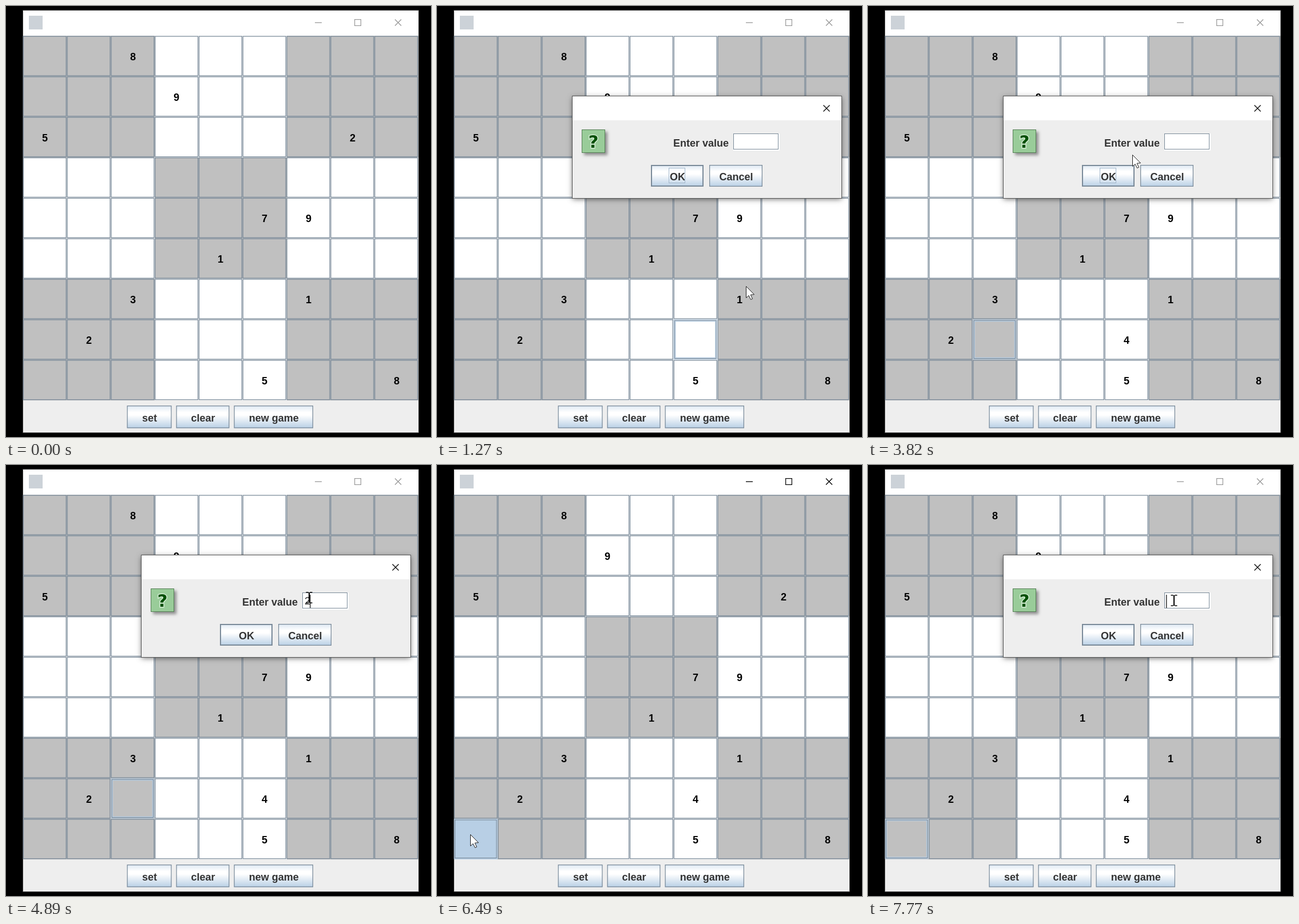
An HTML page with a canvas for the animation above (7.99 s loop, 743 by 754 pixels).

```html
<!DOCTYPE html>
<html lang="en">
<head>
<meta charset="utf-8">
<title>Number puzzle</title>
<style>
html, body { margin: 0; width: 100%; height: 100%; overflow: hidden; background: #000; }
canvas { display: block; }
</style>
</head>
<body>
<canvas id="stage" width="743" height="754"></canvas>
<script>
const ctx = document.getElementById("stage").getContext("2d");
const LOOP = 7990, TICK = 106.6;
const GRID = { x: 29.65, y: 52.4, w: 76.81, h: 70.85 };
const EDGE = "#7a8a99", PALE = "#b8cfe5", FOCUS = "#a3b8cc", PANEL = "#eeeeee", INK = "#333333";
const BOLD = "bold 18px 'Liberation Sans', Arial, sans-serif";
const PLAIN = "18px 'Liberation Sans', Arial, sans-serif";
const PUZZLE = ["  8", "   9", "5      2", "", "     79", "    1", "  3   1", " 2", "     5  8"];

// Each turn clicks a cell, opens the input box, focuses its field and types a digit.
const TURNS = [
  { press: 950, open: 1050, focus: 1900, type: 2330, close: 2540, digit: "4" },
  { press: 3820, open: 3820, focus: 4570, type: 4890, close: 5110, digit: "2" },
  { press: 6490, open: 6600, focus: 7120, type: LOOP, close: LOOP, digit: "" }
];
const MESSAGE = { open: 5210, close: 5750 };

// Pointer strokes: start time, end time, destination.
const ENTRY = { x: 672, y: 690, time: 520 };
const STROKES = [
  [520, 900, 456, 586], [1060, 1260, 540, 490], [1270, 1460, 557, 234],
  [2750, 3180, 300, 605], [3290, 3390, 232, 592], [3730, 3820, 462, 260],
  [3830, 4150, 533, 210], [4260, 4660, 530, 232], [5860, 6280, 6, 662],
  [6290, 6480, 58, 646], [6500, 7020, 544, 229], [7560, 7760, 535, 237]
];

const easeOut = p => 1 - (1 - p) ** 3;
const within = (time, from, to) => time >= from && time < to;

// The pointer moves in steps, as in a screen recording.
function pointerAt(time) {
  const stepped = ENTRY.time + Math.floor((time - ENTRY.time + 13) / TICK) * TICK;
  let { x, y } = ENTRY;
  for (const [start, end, toX, toY] of STROKES) {
    if (stepped <= start) break;
    const p = easeOut(Math.min(1, (stepped - start) / (end - start)));
    x += (toX - x) * p;
    y += (toY - y) * p;
  }
  return { x, y };
}

function cellAt({ x, y }) {
  const col = Math.floor((x - GRID.x) / GRID.w), row = Math.floor((y - GRID.y) / GRID.h);
  return col >= 0 && col < 9 && row >= 0 && row < 9 ? row * 9 + col : -1;
}

function stateAt(time) {
  const [first, second] = TURNS;
  const pointer = time >= ENTRY.time ? pointerAt(time) : null;
  const turn = TURNS.findLast(t => time >= t.press);
  const input = turn && within(time, turn.open, turn.close);
  const blocked = input || within(time, second.close, MESSAGE.close);
  const target = blocked ? pointerAt(turn.open - 60) : pointer;
  return {
    pointer, input, turn,
    active: Boolean(turn) && !blocked,
    hover: target ? cellAt(target) : -1,
    pressed: turn && within(time, turn.press, turn.open),
    focused: input && time >= turn.focus,
    caret: input && time >= turn.focus + TICK - 5,
    typed: input && time >= turn.type ? turn.digit : "",
    message: within(time, MESSAGE.open, MESSAGE.close),
    solved: time >= first.close,
    boxed: within(time, first.close, second.open)
  };
}

function fill(x, y, w, h, color) {
  ctx.fillStyle = color;
  ctx.fillRect(x, y, w, h);
}

function frame(x, y, w, h, color, line = 1) {
  ctx.strokeStyle = color;
  ctx.lineWidth = line;
  ctx.strokeRect(x + line / 2, y + line / 2, w - line, h - line);
}

function text(string, x, y, { font = BOLD, color = INK, align = "left" } = {}) {
  ctx.font = font;
  ctx.fillStyle = color;
  ctx.textAlign = align;
  ctx.fillText(string, x, y);
}

function cross(x, y, size, color) {
  ctx.strokeStyle = color;
  ctx.lineWidth = 1.3;
  ctx.beginPath();
  ctx.moveTo(x, y);
  ctx.lineTo(x + size, y + size);
  ctx.moveTo(x + size, y);
  ctx.lineTo(x, y + size);
  ctx.stroke();
}

function withShadow(blur, dx, dy, alpha, draw) {
  ctx.save();
  ctx.shadowColor = `rgba(0,0,0,${alpha})`;
  ctx.shadowBlur = blur;
  ctx.shadowOffsetX = dx;
  ctx.shadowOffsetY = dy;
  draw();
  ctx.restore();
}

function button(label, x, y, w, h, isDefault) {
  const shade = ctx.createLinearGradient(0, y, 0, y + h);
  shade.addColorStop(0, "#dde8f3");
  shade.addColorStop(0.3, "#ffffff");
  shade.addColorStop(0.42, "#ffffff");
  shade.addColorStop(1, PALE);
  fill(x, y, w, h, shade);
  frame(x, y, w, h, EDGE, isDefault ? 2 : 1.25);
  text(label, x + w / 2 + 0.5, y + h / 2 + 8, { align: "center" });
}

function drawCell(index, state) {
  const col = index % 9, row = Math.floor(index / 9);
  const x = GRID.x + col * GRID.w, y = GRID.y + row * GRID.h;
  const w = GRID.w - 0.7, h = GRID.h - 0.7;
  const shaded = (Math.floor(col / 3) + Math.floor(row / 3)) % 2 === 0;
  const hovered = state.hover === index;
  const color = hovered && state.pressed ? PALE : shaded ? "#c0c0c0" : "#ffffff";
  fill(Math.round(x), Math.round(y), Math.ceil(GRID.w), Math.ceil(GRID.h), color);
  const rings = hovered ? [PALE, EDGE, PALE] : [EDGE];
  rings.forEach((ring, i) => {
    const inset = i * 1.25;
    frame(x + inset, y + inset, w - 2 * inset, h - 2 * inset, ring, 1.25);
  });
}

function drawDigit(col, row, digit) {
  const x = GRID.x + (col + 0.5) * GRID.w, y = GRID.y + (row + 0.5) * GRID.h;
  text(digit, Math.round(x), y + 7.1, { color: "#000", align: "center" });
}

function drawWindow(state) {
  const control = state.active ? "#000000" : "#999999";
  fill(0, 0, 743, 754, "#000000");
  frame(29, 7, 693, 740, state.active ? "#333333" : "#444444");
  fill(30, 8, 691, 44, "#ffffff");
  fill(30, 52, 691, 694, PANEL);
  fill(40, 17, 24, 24, "#ccd2d8");
  fill(540, 28.5, 12, 1.3, control);
  frame(609, 23, 12, 12, control, 1.2);
  cross(680, 23.5, 11, control);

  for (let i = 0; i < 81; i++) drawCell(i, state);
  PUZZLE.forEach((line, row) => [...line].forEach((digit, col) => drawDigit(col, row, digit)));
  if (state.solved) drawDigit(5, 7, TURNS[0].digit);
  if (state.boxed) frame(445, 570, 13, 27, FOCUS);

  button("set", 211.5, 699, 78, 39.5);
  button("clear", 297.5, 699, 93, 39.5);
  button("new game", 398.5, 699, 138.5, 39.5);
}

function drawDialog(x, y, title) {
  withShadow(9, 0, 2, 0.55, () => fill(x, y, 470, 178, PANEL));
  fill(x, y, 470, 42, "#ffffff");
  frame(x - 1, y - 1, 472, 180, "#555555");
  cross(x + 438.5, y + 15.5, 11, "#000000");
  text(title, x + 11, y + 28, { font: "17.2px 'Open Sans', 'Noto Sans', sans-serif", color: "#000" });
}

function drawInput(state) {
  drawDialog(237, 158, "");
  withShadow(5, 4, 4, 0.4, () => fill(253, 216, 41, 41, "#99cc99"));
  frame(253, 216, 41, 41, "#557f55");
  ctx.font = "bold 31px 'DejaVu Sans', sans-serif";
  ctx.textAlign = "center";
  ctx.lineWidth = 3;
  ctx.strokeStyle = "#d5ecd5";
  ctx.strokeText("?", 273.5, 248);
  text("?", 273.5, 248, { font: ctx.font, color: "#005000", align: "center" });

  text("Enter value", 413, 246);
  fill(518, 223, 81, 30, "#ffffff");
  frame(518, 223, 79, 28, EDGE);
  text(state.typed, 522, 244, { font: PLAIN });
  if (state.caret) fill(state.typed ? 531 : 521, 227, 1.5, 23, INK);

  button("OK", 374, 278, 92, 38, true);
  if (!state.focused) frame(405, 283, 29, 27, FOCUS);
  button("Cancel", 476, 278, 93, 38);
}

function drawMessage() {
  drawDialog(140, 288, "Message");
  ctx.beginPath();
  ctx.arc(176.5, 365, 19, 0, Math.PI * 2);
  ctx.fillStyle = "#ccccff";
  withShadow(5, 4, 4, 0.4, () => ctx.fill());
  ctx.strokeStyle = "#666699";
  ctx.lineWidth = 1.5;
  ctx.stroke();
  for (const [shift, color] of [[1.3, "#ffffff"], [0, "#666699"]]) {
    fill(173.5 + shift, 353 + shift, 6, 5, color);
    fill(171.5 + shift, 361 + shift, 8, 2.5, color);
    fill(173.5 + shift, 361 + shift, 6, 15, color);
    fill(171 + shift, 374 + shift, 11, 2.5, color);
  }
  text("Illegal value", 226, 377);
  button("OK", 345, 408, 59, 38, true);
  frame(360, 414, 29, 26, FOCUS);
}

function drawBeam(x, y) {
  fill(x - 1, y - 9, 2, 18, "#000000");
  for (const end of [-10, 8.5]) {
    fill(x - 5.5, y + end, 4.5, 1.5, "#000000");
    fill(x + 1, y + end, 4.5, 1.5, "#000000");
  }
}

function drawArrow(x, y) {
  const outline = new Path2D("M.5 .5v20l4.6-4 3.4 7 3-1.3-3.3-7 6.3-.5z");
  ctx.save();
  ctx.translate(x, y);
  ctx.fillStyle = "#ffffff";
  ctx.fill(outline);
  ctx.strokeStyle = "#222222";
  ctx.lineWidth = 1;
  ctx.stroke(outline);
  ctx.restore();
}

function drawPointer({ pointer, input }) {
  if (!pointer) return;
  const x = Math.round(pointer.x), y = Math.round(pointer.y);
  const overField = input && within(x, 518, 597) && within(y, 223, 251);
  (overField ? drawBeam : drawArrow)(x, y);
}

function render() {
  const state = stateAt(performance.now() % LOOP);
  drawWindow(state);
  if (state.input) drawInput(state);
  if (state.message) drawMessage();
  drawPointer(state);
  requestAnimationFrame(render);
}
render();
</script>
</body>
</html>
```
